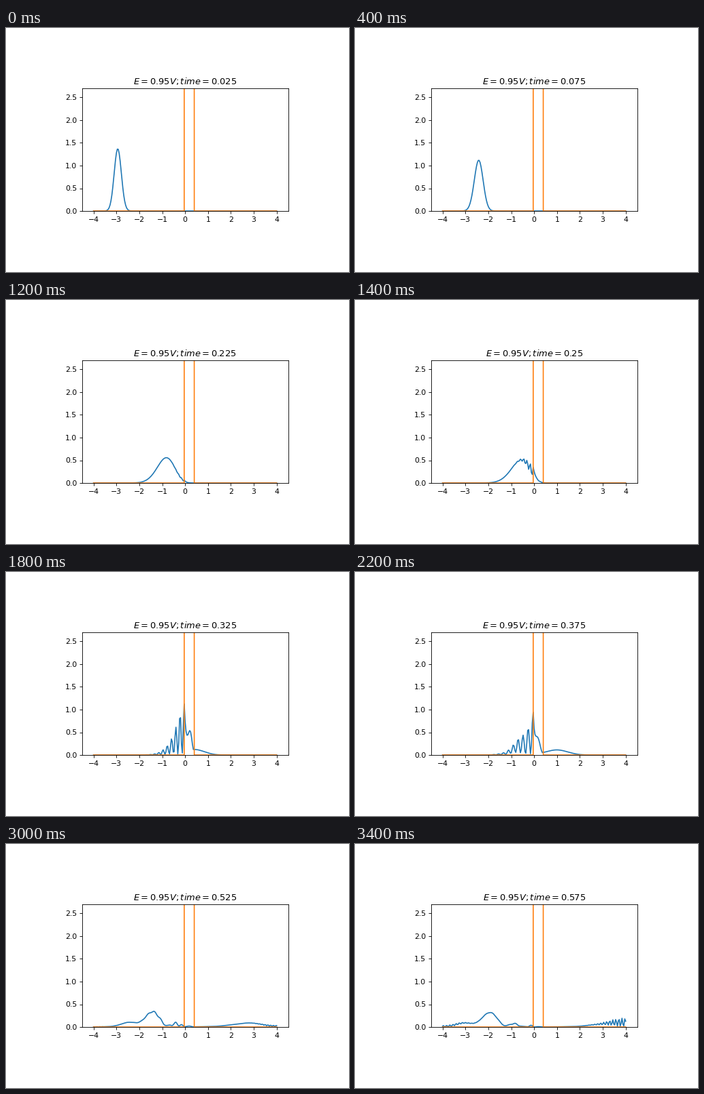
A matplotlib script for the animation above (3600 ms loop, 504 by 360 pixels).

```python
import matplotlib.pyplot as plt
import numpy as np
from matplotlib.animation import FuncAnimation

DPI = 78.125
WIDTH, HEIGHT = 504, 360
FRAMES, INTERVAL = 18, 200

# Wave packet and barrier, in units where i psi' = -(D/2) psi'' + U psi
D = 0.64
K0 = 17.8
START = -3.2
SIGMA = 0.152
PEAK = 1.417
POINTS = 201

x = np.linspace(-4, 4, POINTS)
dx = x[1] - x[0]
energy = D * (1 - np.cos(K0 * dx)) / dx**2
barrier = energy / 0.95 * ((x > -dx / 2) & (x < 0.4 - dx / 2))


def solve_box():
    """Energies and states of the barrier inside a hard-walled grid."""
    hop = np.full(POINTS - 1, -D / 2 / dx**2)
    return np.linalg.eigh(np.diag(barrier + D / dx**2)
                          + np.diag(hop, 1) + np.diag(hop, -1))


energies, states = solve_box()
psi0 = np.sqrt(PEAK) * np.exp(-((x - START) / (2 * SIGMA)) ** 2 + 1j * K0 * x)
weights = states.T @ psi0


def density(t):
    return np.abs(states @ (weights * np.exp(-1j * energies * t))) ** 2


def time_at(i):
    # every fourth time step is skipped
    return round(0.025 * (i + i // 3 + 1), 3)


fig = plt.figure(figsize=(WIDTH / DPI, HEIGHT / DPI), dpi=DPI, facecolor="white")
ax = fig.add_axes([111.83 / WIDTH, 1 - 270 / HEIGHT, 302.7 / WIDTH, 180.9 / HEIGHT])
ax.set_xlim(-4.5, 4.5)
ax.set_ylim(0, 2.7)
ax.set_xticks(range(-4, 5))
wave, = ax.plot(x, density(time_at(0)), color="C0")
ax.plot(x, barrier, color="C1")
title = ax.set_title("")


def update(i):
    t = time_at(i)
    wave.set_ydata(density(t))
    title.set_text(f"$E=0.95V; time = {t}$")
    return wave, title


anim = FuncAnimation(fig, update, frames=FRAMES, interval=INTERVAL,
                     repeat=True, repeat_delay=0)
plt.show()
```
